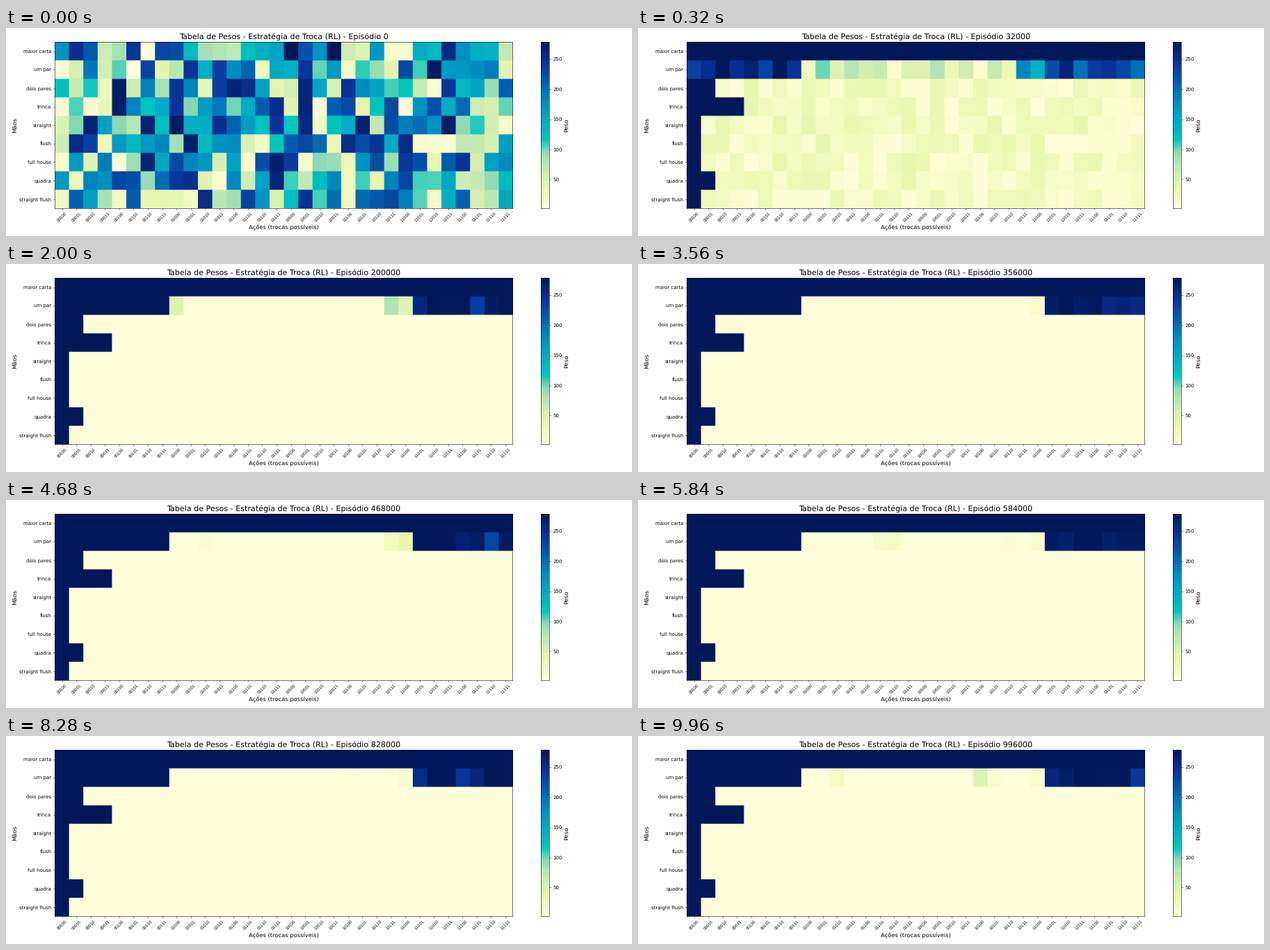
Write a matplotlib script that moves like this. It is 900x300 px and loops after 10 s.

```python
import numpy as np
import matplotlib.pyplot as plt
from matplotlib.animation import FuncAnimation
from matplotlib.colors import LinearSegmentedColormap

W, H, DPI = 900, 300, 50
FRAMES, INTERVAL, EPISODES = 250, 40, 4000
LOW, HIGH, WON = 2.2, 278, 340
HANDS = ["maior carta", "um par", "dois pares", "trinca", "straight",
         "flush", "full house", "quadra", "straight flush"]
KEPT = [32, 8, 2, 4, 1, 1, 1, 2, 1]  # winning actions of each hand
ACTIONS = [format(i, "05b") for i in range(32)]
SHAPE = len(HANDS), len(ACTIONS)
PAIR = 1
LOSING, WAVERING = slice(8, 25), slice(25, 32)
CELL = np.ones((20, 20))  # fine cells let edges fall between pixels

plt.rcParams.update({"font.family": "DejaVu Sans", "text.hinting": "none"})
rng = np.random.default_rng(7)


def smooth_noise():
    kernel = np.hanning(13)
    kernel /= np.sqrt((kernel ** 2).sum())
    raw = rng.normal(size=(len(ACTIONS), FRAMES + len(kernel) - 1))
    return np.array([np.convolve(row, kernel, "valid") for row in raw]).T


START = rng.uniform(LOW, HIGH, SHAPE)
GOAL = np.array([[WON if col < kept else LOW for col in range(SHAPE[1])]
                 for kept in KEPT])
DECAY = np.where(np.arange(SHAPE[0]) == PAIR, 7, 4)[:, None]
NOISE = smooth_noise()


def pair_goal(n):
    """Goal of the pair row: its undecided actions keep drifting."""
    goal = GOAL[PAIR].copy()
    unrest = 1 + 3 * np.exp(-n / 20)
    goal[LOSING] += 25 * unrest * np.maximum(NOISE[n, LOSING] - 1.2, 0)
    goal[WAVERING] = HIGH - 10 * unrest * NOISE[n, WAVERING] ** 2
    goal[23] = max(goal[23], 4 * (70 - n))
    goal[24] = max(goal[24], 1.2 * (90 - n), 14)
    return goal


def weights(n):
    goal = GOAL.copy()
    goal[PAIR] = pair_goal(n)
    grid = goal + (START - goal) * np.exp(-n / DECAY)
    return np.kron(np.clip(grid, LOW, HIGH), CELL)


def box(x, y, w, h):
    return [x / W, 1 - (y + h) / H, w / W, h / H]


cmap = LinearSegmentedColormap.from_list("weights", [
    (0, "#ffffd9"), (0.125, "#eaf8b0"), (0.25, "#c3eab4"),
    (0.34, "#8edab4"), (0.41, "#00c8be"), (0.5, "#00b2c4"),
    (0.625, "#0094c2"), (0.75, "#0062b0"), (0.875, "#0c3499"),
    (1, "#00185a")])

fig = plt.figure(figsize=(W / DPI, H / DPI), dpi=DPI, facecolor="white")
ax = fig.add_axes(box(70.3, 20.4, 658, 239.4))
cax = fig.add_axes(box(769.4, 20.4, 12, 239.4))
image = ax.imshow(weights(0), cmap=cmap, vmin=LOW, vmax=HIGH, aspect="auto",
                  extent=(-0.5, SHAPE[1] - 0.5, SHAPE[0] - 0.5, -0.5),
                  interpolation="bilinear", interpolation_stage="rgba")
bar = fig.colorbar(image, cax=cax)
bar.set_label("Peso", fontsize=12)
ax.set_xticks(range(len(ACTIONS)), ACTIONS, rotation=45, fontsize=8)
ax.set_yticks(range(len(HANDS)), HANDS, fontsize=10)
ax.set_xlabel("Ações (trocas possíveis)", fontsize=12)
ax.set_ylabel("Mãos", fontsize=12)
title = ax.set_title("", fontsize=16)


def update(n):
    image.set_data(weights(n))
    title.set_text("Tabela de Pesos - Estratégia de Troca (RL) - "
                   f"Episódio {n * EPISODES}")
    return image, title


anim = FuncAnimation(fig, update, frames=FRAMES, interval=INTERVAL,
                     init_func=lambda: update(0), repeat=True, repeat_delay=0)
plt.show()
```
